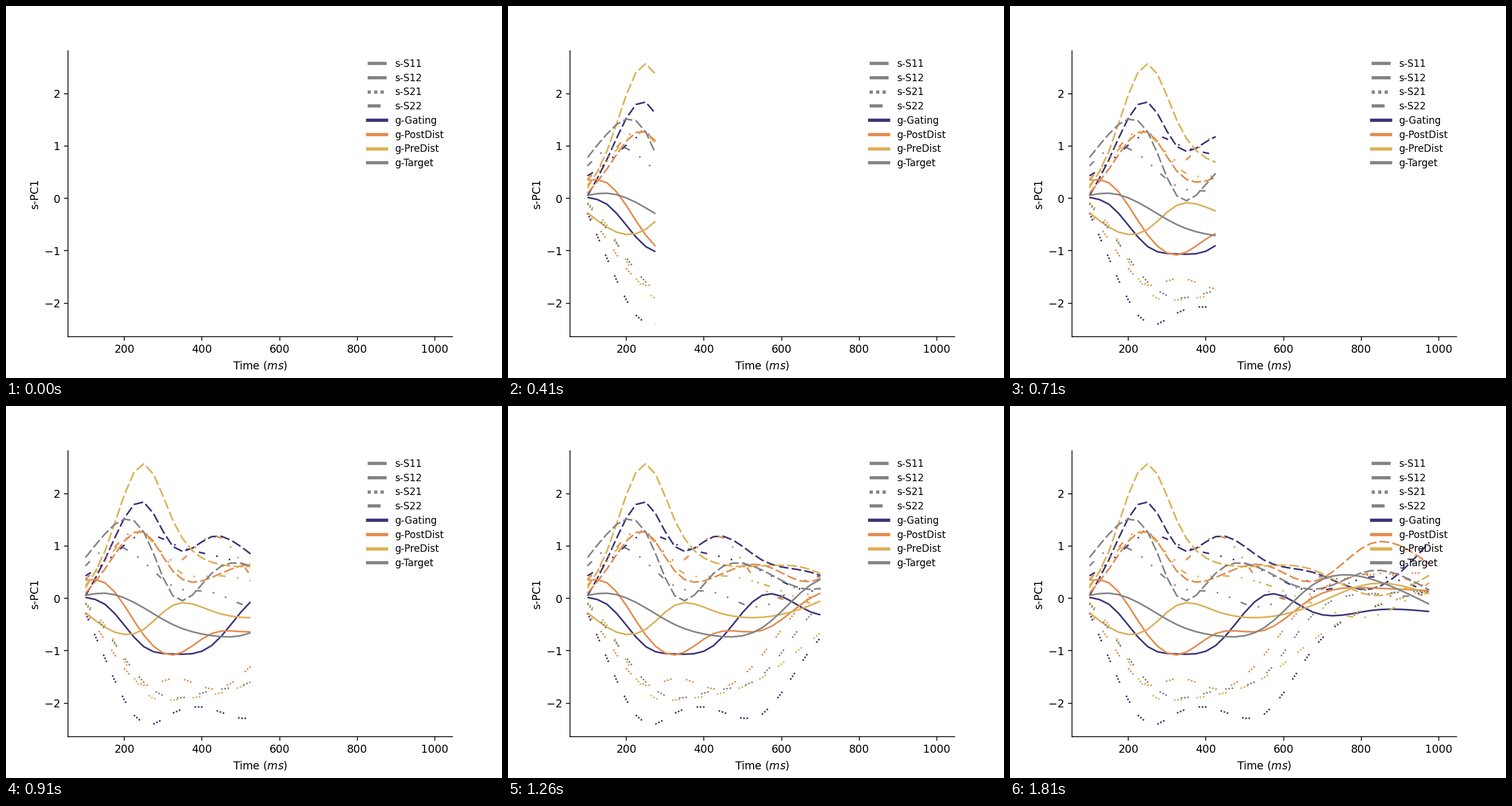
A matplotlib script for the animation above (1.86 s loop, 864x648 px).

```python
import numpy as np
import matplotlib.pyplot as plt
from matplotlib.animation import FuncAnimation
from matplotlib.lines import Line2D

STEP = 10          # ms per animation tick
LOOP = 1860        # ms per loop
HOLD, PACE = 110, 50

COLORS = {"Gating": "#3b3478", "PostDist": "#e38b4d",
          "PreDist": "#dbb055", "Target": "#838383"}
DASHES = {"S11": "-",
          "S12": (0, (6, 2)),
          "S21": (0, (1, 1, 1, 1, 1, 9)),
          "S22": (0, (4, 7, 1, 7, 1, 7))}

# key moments shared by all curves, denser during the early response
KEYS = np.array([100, 150, 250, 325, 425, 550, 675, 825, 975])
times = np.arange(100, 976, 25)


def spline(x, y, at):
    """Natural cubic spline through (x, y), evaluated at `at`."""
    h, n = np.diff(x), len(x)
    a, b = np.eye(n), np.zeros(n)
    for i in range(1, n - 1):
        a[i, i - 1:i + 2] = h[i - 1], 2 * (h[i - 1] + h[i]), h[i]
        b[i] = 6 * ((y[i + 1] - y[i]) / h[i] - (y[i] - y[i - 1]) / h[i - 1])
    m = np.linalg.solve(a, b)
    k = np.clip(np.searchsorted(x, at, side="right") - 1, 0, n - 2)
    u, v, w = x[k + 1] - at, at - x[k], h[k]
    return ((m[k] * u**3 + m[k + 1] * v**3) / (6 * w)
            + (y[k] / w - m[k] * w / 6) * u
            + (y[k + 1] / w - m[k + 1] * w / 6) * v)


fig, ax = plt.subplots(figsize=(6.4, 4.8), dpi=135)
fig.subplots_adjust(bottom=0.111)
ax.set(xlim=(55, 1045), ylim=(-2.64, 2.821),
       xlabel="Time ($ms$)", ylabel="s-PC1")
ax.spines[["top", "right"]].set_visible(False)

curves = []


def add(style, *rows):
    for g, (color, row) in enumerate(zip(COLORS.values(), rows)):
        line, = ax.plot([], [], color=color, lw=1.5, ls=DASHES[style],
                        solid_capstyle="butt", zorder=2 + g / 100)
        curves.append((line, spline(KEYS, np.array(row), times)))


add("S11",
    (.02, -.11, -.92, -1.06, -.90, .06, -.26, -.23, -.25),
    (.35, .30, -.70, -1.08, -.67, -.61, .01, .20, .15),
    (-.27, -.55, -.59, -.13, -.24, -.36, -.13, .28, .09),
    (.06, .10, -.18, -.50, -.71, -.56, .26, .37, -.11))
add("S12",
    (.05, .74, 1.84, .99, 1.18, .73, .50, .18, 1.07),
    (.10, .56, 1.27, .52, .40, .64, .32, 1.05, .66),
    (.20, .90, 2.57, 1.49, .69, .62, .55, .06, .44),
    (.78, 1.23, 1.27, .05, .48, .54, .17, .53, .16))
add("S21",
    (-.28, -1.14, -2.39, -2.19, -2.11, -2.21, -.97, -.18, .15),
    (-.27, -.79, -1.66, -1.52, -1.73, -1.08, .05, .45, .49),
    (-.08, -.51, -1.78, -1.94, -1.84, -1.51, -.80, -.16, .10),
    (-.10, -.59, -1.60, -1.90, -1.76, -1.47, -.31, .09, .15))
add("S22",
    (.43, .68, 1.23, 1.04, .83, .52, .14, .41, .11),
    (.36, .75, 1.28, .70, 1.21, .20, .10, .48, .20),
    (.25, .70, 1.23, .60, .43, .28, -.10, -.35, .30),
    (.62, .95, .70, .23, .12, -.16, .39, .12, .08))

handles = [Line2D([], [], color=COLORS["Target"], lw=3, ls=ls,
                  solid_capstyle="butt", label=f"s-{name}")
           for name, ls in DASHES.items()]
handles += [Line2D([], [], color=c, lw=3, label=f"g-{name}")
            for name, c in COLORS.items()]
ax.legend(handles=handles, loc="upper right", bbox_to_anchor=(1, 1.002),
          fontsize=9, labelspacing=0.4, frameon=False)


def update(i):
    t = i * STEP
    n = 0 if t < HOLD else (t - HOLD) // PACE + 2
    for line, values in curves:
        line.set_data(times[:n], values[:n])
    return [line for line, _ in curves]


anim = FuncAnimation(fig, update, frames=LOOP // STEP, interval=STEP,
                     repeat=True, repeat_delay=0)
plt.show()
```
